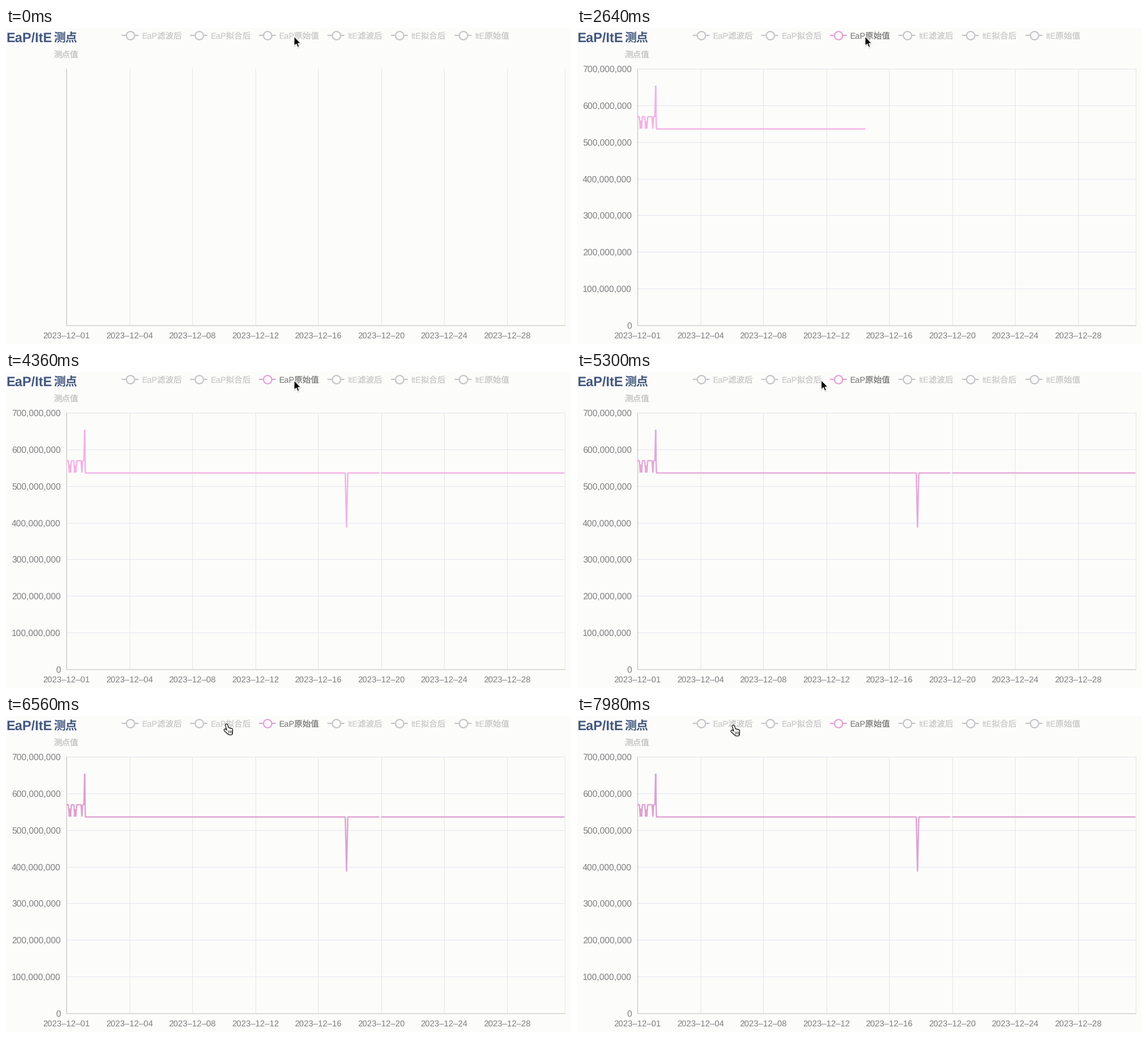
A matplotlib script that plays this animation: 1001 px wide and 559 px high, repeating every 8000 ms.

```python
import numpy as np
import matplotlib.pyplot as plt
from matplotlib.animation import FuncAnimation
from matplotlib.colors import to_rgb
from matplotlib.patches import Polygon
from matplotlib.transforms import Bbox

W, H, DPI = 1001, 559, 64
TICK_MS, LOOP_MS = 20, 8000
PX = 72 / DPI  # points per pixel

LEFT, RIGHT, TOP, BOTTOM = 107.5, 990.5, 72.5, 526.5
COLUMN = 111.57
PAPER, OFF, PINK = "#fcfcfb", "#c5c5ca", "#e4a2d5"
BRIGHT, DIM = np.array(to_rgb("#f5b1e6")), np.array(to_rgb("#dfa1d2"))
TEXT_OFF, TEXT_ON, LABEL = "#c4c4c4", "#747474", "#7e7e80"

plt.rcParams["font.family"] = ["Liberation Sans", "Noto Sans CJK JP"]
plt.rcParams["text.hinting"] = "none"

fig = plt.figure(figsize=(W / DPI, H / DPI), dpi=DPI, facecolor=PAPER)
ax = fig.add_axes([0, 0, 1, 1])
ax.set_xlim(0, W)
ax.set_ylim(H, 0)
ax.axis("off")


def label(x, y, text, size, color, ha="left", **style):
    return ax.text(x, y, text, fontsize=size * PX, color=color, ha=ha,
                   va="baseline", **style)


def stroke(xs, ys, color, width=1, **style):
    return ax.plot(xs, ys, color=color, lw=width * PX, snap=False, **style)[0]


def broken(segments):
    """Join separate segments into one path with gaps."""
    points = []
    for a, b in segments:
        points += [a, b, (np.nan, np.nan)]
    return np.array(points, float).T


def crisp(values):
    """Move coordinates to pixel centres."""
    return np.floor(values) + 0.5


# Title and axis name
label(0.8, 24.8, "EaP/ItE", 23.6, "#43587f", weight="bold")
label(84, 24.4, "测点", 21, "#43587f", weight="bold")
label(84.5, 52.3, "测点值", 14.6, "#bdbdbd")

# Time axis
columns = crisp(np.append(LEFT + COLUMN * np.arange(1, 8), RIGHT))
stroke(*broken([((x, TOP), (x, BOTTOM)) for x in columns]), "#e5e6de", zorder=1)
for k in range(8):
    label(LEFT - 0.5 + COLUMN * k, 549.2, f"2023–12–{max(1, 4 * k):02d}",
          15, LABEL, "center")
stroke([LEFT, LEFT], [TOP, BOTTOM], "#babab6", zorder=3)
stroke([LEFT, RIGHT], [BOTTOM, BOTTOM], "#c2c2ba", zorder=3)

# Value axis, present only while a series is shown
rows = crisp(np.linspace(BOTTOM, TOP, 8))
value_axis = [stroke(*broken([((LEFT, y), (RIGHT, y)) for y in rows[1:]]),
                     "#e2e5ee", zorder=1)]
for k, y in enumerate(rows):
    value_axis.append(label(97, y + 5.4, f"{k * 100_000_000:,}", 15.6, LABEL, "right"))

# Legend
legend, x = {}, 205
for point, pitch in (("EaP", 121.5), ("ItE", 112.5)):
    for kind in ("滤波后", "拟合后", "原始值"):
        icon = stroke([x, x + 15, x + 30], [13, 13, 13], OFF, 2.2, marker="o",
                      markevery=[1], markersize=14.6 * PX, markerfacecolor=PAPER,
                      markeredgewidth=2.2 * PX, solid_capstyle="butt")
        legend[point + kind] = icon, label(x + 36, 18.4, point + kind, 14.6, TEXT_OFF)
        x += pitch
active_icon, active_text = legend["EaP原始值"]

# Measured series: two levels with narrow triangular spikes and one gap
xs = np.arange(LEFT, RIGHT - 1, 0.1)
ys = np.where(xs < 140, 157, 178.6)


def spike(centre, half_width, height):
    return height * np.clip(1 - abs(xs - centre) / half_width, 0, 1)


for centre in (112, 114.3, 121.6, 123.8, 134.4):
    ys += spike(centre, 1.4, 21)
ys += spike(139.3, 1.3, -55) + spike(603.3, 2.2, 96.5)
ys[abs(xs - 663) < 1.5] = np.nan
curve = stroke(xs, ys, PINK, 2.4, zorder=4, solid_joinstyle="bevel",
               solid_capstyle="butt")

# Mouse pointers, relative to the hot spot
ARROW = np.array([(0, 0), (0, 16.6), (3.8, 13.1), (6.3, 19), (9, 17.9),
                  (6.6, 12.1), (11.6, 12.1)])
FINGERS = [((4 + 2.5 * k, 8.6 + 0.7 * k), (5 + 1.8 * k, 16)) for k in range(3)]
HAND = broken([((0, 2), (3.6, 13)), ((-2.2, 10.8), (3, 15.6)),
               ((5, 17.2), (8.6, 17.2))] + FINGERS)
CREASES = broken([((x, 12), (x + 0.3, 16.2)) for x in (4, 6.6, 9.2)])


def arrow_patch(face, edge, width):
    return ax.add_patch(Polygon(ARROW, fc=face, ec=edge, lw=width * PX,
                                joinstyle="round", zorder=10))


arrow_parts = [(arrow_patch((0, 0, 0, 0.12), (0, 0, 0, 0.06), 2), (0.6, 1.6)),
               (arrow_patch("black", "white", 1.1), (0, 0))]
hand_parts = [(stroke(*shape, color, width, zorder=10 + z, solid_capstyle="round"), shape)
              for z, (shape, color, width) in enumerate(
                  [(HAND, "black", 5.4), (HAND, "white", 3), (CREASES, "black", 0.9)])]


def glide(ms, start, end):
    """Ease from 0 to 1 between two times."""
    u = np.clip((ms - start) / (end - start), 0, 1)
    return u * u * (3 - 2 * u)


def screen_step(ms):
    """The screen refreshes three times per 140 ms, at 0, 20 and 120."""
    cycle, rest = divmod(ms, 140)
    sub = (rest >= 20) + (rest >= 120)
    return 3 * cycle + sub, 140 * cycle + (0, 20, 120)[sub]


def place_pointer(first, second):
    pos = np.array([510.5 - 120 * first - 113.5 * second, 15 - first + 2 * second])
    over_item = pos[0] < 313 or 326 < pos[0] < 431
    for patch, shift in arrow_parts:
        patch.set_xy(ARROW + pos + shift)
        patch.set_visible(not over_item)
    for line, shape in hand_parts:
        line.set_data(shape + pos[:, None])
        line.set_visible(over_item)


def update(frame):
    step, ms = screen_step(frame * TICK_MS)
    shown = step >= 28
    for artist in value_axis:
        artist.set_visible(shown)
    active_icon.set_color(PINK if shown else OFF)
    active_icon.set_markeredgecolor(PINK if shown else OFF)
    active_text.set_color(TEXT_ON if shown else TEXT_OFF)

    # The series wipes in at constant speed and dims as the pointer leaves
    edge = LEFT + 15.1 * (step - 29.3)
    leaving = glide(ms, 4700, 5700)
    curve.set_visible(edge > LEFT)
    curve.set_clip_box(Bbox.from_extents(LEFT - 1, 0, np.clip(edge, LEFT, W), H))
    curve.set_color(BRIGHT + (DIM - BRIGHT) * leaving)

    place_pointer(leaving, glide(ms, 7000, 7700))
    return []


anim = FuncAnimation(fig, update, frames=LOOP_MS // TICK_MS, interval=TICK_MS,
                     init_func=lambda: update(0), repeat=True, repeat_delay=0)
plt.show()
```
